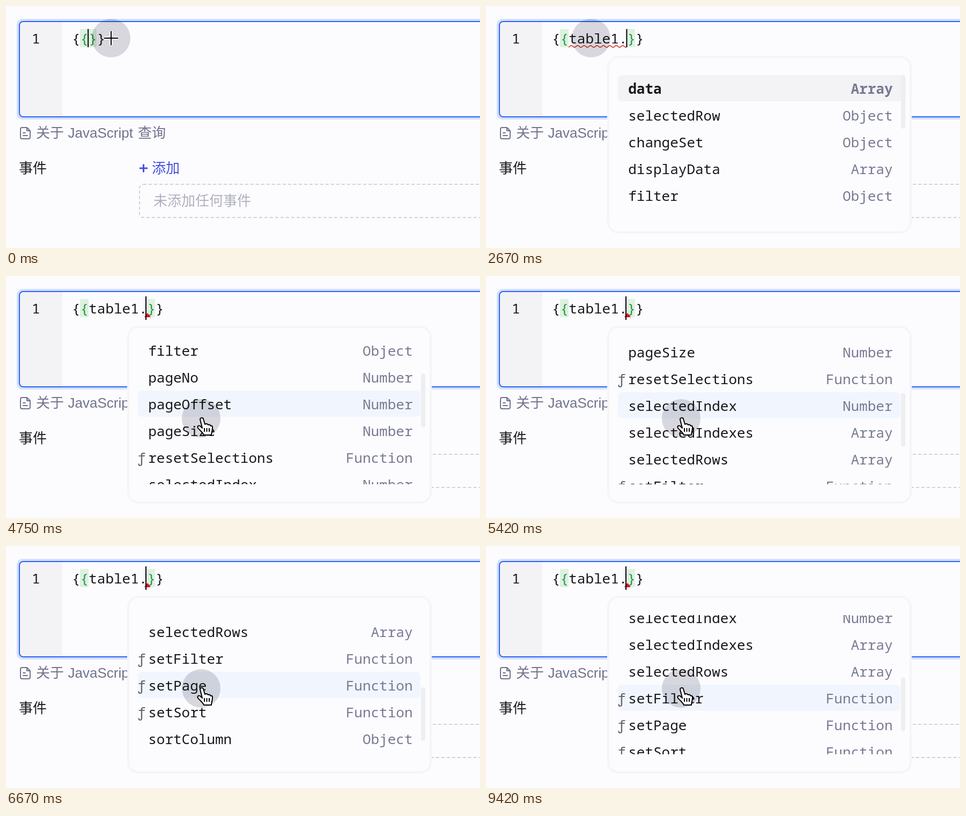
Animation of 884 by 452 pixels, one loop 9.83 s. Source, as an HTML page:

```html
<!DOCTYPE html>
<html lang="zh-CN">
<head>
<meta charset="utf-8">
<style>
  html, body { margin: 0; width: 100%; height: 100%; overflow: hidden; background: #fcfcff; }
  svg { display: block; }
  text { font: 26px "Liberation Sans", "Noto Sans CJK SC", "Noto Sans CJK", sans-serif; fill: #17181c; }
  .code { font: 26px "Roboto Mono", "Noto Sans Mono", monospace; white-space: pre; }
  .type { fill: #787a92; text-anchor: end; }
  .selected { font-weight: 700; }
  .brace { fill: #2f9150; }
  .spot { fill: #dadadd; mix-blend-mode: multiply; }
</style>
</head>
<body>
<svg width="884" height="452" viewBox="0 0 884 452">
  <defs>
    <clipPath id="listArea"><path d="M240 129h550v260h-550z"/></clipPath>
  </defs>

  <!-- editor frame -->
  <rect x="22" y="26" width="900" height="184" rx="9" fill="none" stroke="#d6defc" stroke-width="4"/>
  <rect x="25" y="29" width="900" height="178" rx="7" fill="#fcfcff"/>
  <path d="M105 29H32a7 7 0 0 0-7 7V200a7 7 0 0 0 7 7h73z" fill="#f3f3f5"/>
  <rect x="25" y="29" width="900" height="178" rx="7" fill="none" stroke="#2567f5" stroke-width="2"/>
  <text class="code" x="48" y="70">1</text>

  <!-- help link -->
  <g fill="none" stroke="#70738c" stroke-width="2" stroke-linecap="round" stroke-linejoin="round">
    <path d="M39 227H30a3 3 0 0 0-3 3v15a3 3 0 0 0 3 3h12a3 3 0 0 0 3-3V233zM39 227v6h6M32 237h4M32 242h8"/>
  </g>
  <text y="246" style="fill:#70738c"><tspan x="56">关于</tspan><tspan x="115.5">JavaScript</tspan><tspan x="246">查询</tspan></text>

  <!-- events -->
  <text x="24" y="312">事件</text>
  <path d="M249 303h15M256.500 295.500v15" stroke="#454fe2" stroke-width="3"/>
  <text x="272" y="312" style="fill:#454fe2">添加</text>
  <rect x="249" y="333" width="700" height="62" rx="7" fill="none" stroke="#d0d1da" stroke-width="2" stroke-dasharray="6 4"/>
  <text x="275" y="373" style="fill:#b0b1bf">未添加任何事件</text>

  <g id="scene"></g>
</svg>

<script>
const LOOP = 9830, FPS = 12;
const CHAR = 15.6, CODE_X = 123, WORD_X = CODE_X + 2 * CHAR;
const ROW = 50, LIST_TOP = 129, POINTER_Y = 262;
const scene = document.getElementById('scene');

const typing = [[12, 't'], [14, 'ta'], [17, 'tab'], [20, 'tabl'], [23, 'table'], [26, 'table1'], [30, 'table1.']];
const variables = ['table1 Object', 'text1 Object', 'tabs1 Object', 'theme Object', 'toggle1 Object'];
const members = [
  'data Array', 'selectedRow Object', 'changeSet Object', 'displayData Array', 'filter Object',
  'pageNo Number', 'pageOffset Number', 'pageSize Number', 'resetSelections Function',
  'selectedIndex Number', 'selectedIndexes Array', 'selectedRows Array', 'setFilter Function',
  'setPage Function', 'setSort Function', 'sortColumn Object'
];

// Keys are [tick, value], with twelve ticks per second.
const scrollKeys = [[44, 0], [50, 166], [51, 188], [57, 215], [59, 222], [64, 355], [65, 362], [67, 362],
  [71, 385], [80, 544], [81, 548], [85, 548], [91, 490], [93, 478], [94, 478], [95, 470]];
const pointerX = [[36, 196], [38, 88], [40, 364]];
const pointerY = [[36, 60], [38, 150], [40, 266]];

function track(keys, tick) {
  if (tick <= keys[0][0]) return keys[0][1];
  const next = keys.findIndex(key => key[0] > tick);
  if (next < 0) return keys[keys.length - 1][1];
  const [t0, a] = keys[next - 1], [t1, b] = keys[next];
  return a + (b - a) * (tick - t0) / (t1 - t0);
}

const box = (x, y, w, h, fill, rx = 0) =>
  `<rect x="${x}" y="${y}" width="${w}" height="${h}" rx="${rx}" fill="${fill}"/>`;
const code = (x, y, content, cls = '') => `<text class="code ${cls}" x="${x}" y="${y}">${content}</text>`;

function caretOn(tick) {
  if (tick < 12) return tick < 6;
  return tick < 30 || Math.floor((tick - 29) / 6) % 2 === 0;
}

function editor(tick) {
  const word = (typing.filter(key => key[0] <= tick).pop() || [0, ''])[1];
  const end = WORD_X + word.length * CHAR;
  let out = box(138, 43, 16, 34, '#dcf2df') + box(end - 1, 43, 15.5, 34, '#dcf2df');
  out += code(CODE_X, 70, '{') + code(CODE_X + CHAR, 70, '{', 'brace') + code(WORD_X, 70, word)
    + code(end, 70, '}', 'brace') + code(end + CHAR, 70, '}');
  if (tick >= 30 && tick < 39) {
    const waves = 'l4-3h2l4 3h2'.repeat(9);
    out += `<path d="M154 77${waves}" fill="none" stroke="#d21" stroke-width="1.5"/>`;
  }
  if (tick >= 39) out += '<path d="M258 77h12l-6-8z" fill="#d11"/>';
  if (caretOn(tick)) {
    out += tick < 35 ? box(end - 2, 43, 2, 34, '#000') : box(260, 38, 2, 44, '#000');
  }
  return out;
}

function popup(items, shift, scroll, hovering) {
  const hovered = hovering ? Math.floor((POINTER_Y - LIST_TOP + scroll) / ROW) : -1;
  let rows = '';
  items.forEach((item, i) => {
    const top = LIST_TOP + i * ROW - scroll;
    if (top < LIST_TOP - ROW || top > 389) return;
    const [name, type] = item.split(' ');
    const cls = i === 0 ? 'selected' : '';
    if (i === 0) rows += box(246, top, 537, 49, '#f3f3f6', 8);
    else if (i === hovered) rows += box(246, top, 527, 49, '#f1f6fe', 8);
    if (type === 'Function') rows += `<text class="code" x="245" y="${top + 35}" style="fill:#63656f">ƒ</text>`;
    rows += code(265.2, top + 35, name, cls) + code(758.5, top + 35, type, 'type ' + cls);
  });
  const thumb = items === members ? box(774, LIST_TOP + scroll * .248, 8, 100, '#eeeef1', 4) : '';
  return `<g transform="translate(${shift})">
    <rect x="228" y="95" width="564" height="328" rx="19" fill="#fcfcff" stroke="#f5f5f7" stroke-width="4"/>
    ${box(230, 97, 560, 324, '#fcfcff', 17)}
    <g clip-path="url(#listArea)">${rows}${thumb}</g></g>`;
}

function pointer(tick) {
  const x = track(pointerX, tick), y = track(pointerY, tick);
  let out = `<circle class="spot" cx="${x}" cy="${y}" r="36"/>`;
  if (tick < 12) {
    const cross = 'M183 60h26M196 47v26';
    out += `<path d="${cross}" stroke="#fff" stroke-width="5"/><path d="${cross}" stroke="#000" stroke-width="2"/>`;
  } else if (x > 230) {
    out += `<g transform="translate(${x - 364} ${y - 266})" stroke="#000" stroke-width="2" stroke-linejoin="round">
      <path fill="#fff" d="M362 268c0-4 5-4 6-1l3 10c2-2 5-1 6 1c2-1 4 0 5 2c3-1 3 1 3 4c0 6-2 8-2 13h-14c-2-5-7-8-11-13c-2-4 2-6 5-3l3 3z"/>
      <path d="M370 284v7M374.500 284v7M379 284v7"/></g>`;
  }
  return out;
}

function render(tick) {
  let list = '';
  if (tick >= 32) list = popup(members, 0, track(scrollKeys, tick), tick >= 40);
  else if (tick >= 14 && tick < 30) list = popup(variables, -7 * CHAR, 0, false);
  scene.innerHTML = editor(tick) + list + pointer(tick);
}

let shown = -1;
function frame() {
  const tick = Math.floor((performance.now() % LOOP + 5) * FPS / 1000);
  if (tick !== shown) render(shown = tick);
  requestAnimationFrame(frame);
}
frame();
</script>
</body>
</html>
```
